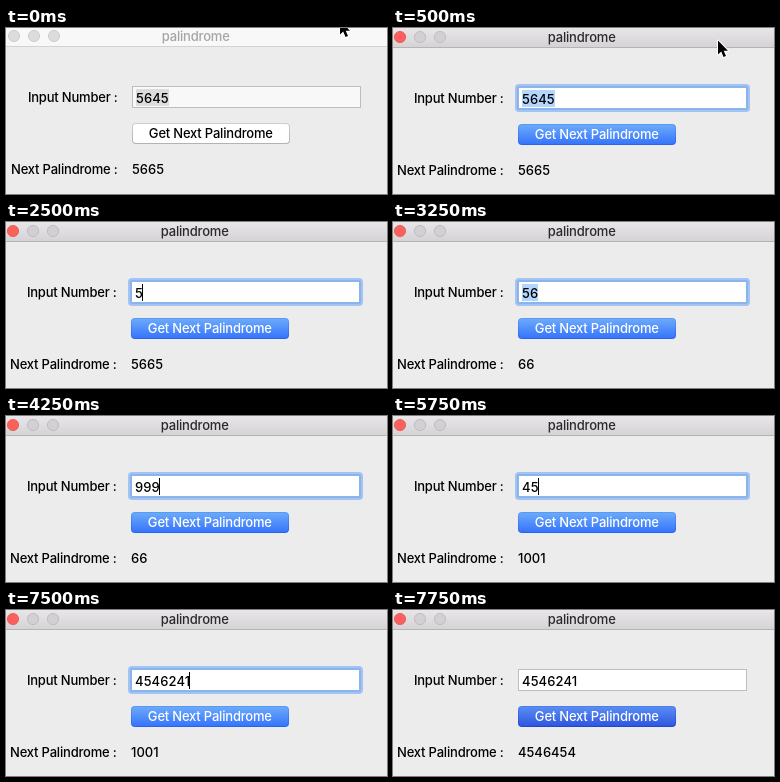
An HTML page with a canvas that plays this animation: 381x166 px, repeating every 8 s.

```html
<!DOCTYPE html>
<html lang="en">
<head>
<meta charset="utf-8">
<title>palindrome</title>
<style>
html, body { margin: 0; width: 100%; height: 100%; overflow: hidden; background: #ececec; }
canvas { display: block; }
</style>
</head>
<body>
<canvas id="stage" width="381" height="166"></canvas>
<script>
const ctx = document.getElementById('stage').getContext('2d');
const LOOP = 8000;
const FONT = '500 13px Inter, "Open Sans", sans-serif';
const FIELD_SPACING = 0.1;

// Each step changes some of the state and keeps the rest.
const steps = [
  [0, { active: false, focus: false, input: '5645', selected: true, result: '5665', pressed: false, cursor: [334, -7.5] }],
  [250, { cursor: [325, 12.5] }],
  [500, { active: true, focus: true }],
  [750, { cursor: [364, 1.5] }],
  [1000, { cursor: null }],
  [2500, { input: '5', selected: false }],
  [2750, { input: '56' }],
  [3250, { result: '66', selected: true }],
  [3750, { input: '9', selected: false }],
  [4000, { input: '99' }],
  [4250, { input: '999' }],
  [4750, { result: '1001', selected: true }],
  [5750, { input: '45', selected: false }],
  [6000, { input: '454' }],
  [6500, { input: '4546' }],
  [6750, { input: '45462' }],
  [7000, { input: '454624' }],
  [7500, { input: '4546241' }],
  [7750, { result: '4546454', focus: false, pressed: true }]
];

function stateAt(t) {
  const state = {};
  for (const [start, change] of steps) if (t >= start) Object.assign(state, change);
  return state;
}

function rect(x, y, w, h, fill) {
  ctx.fillStyle = fill;
  ctx.fillRect(x, y, w, h);
}

function rounded(x, y, w, h, r, fill) {
  ctx.beginPath();
  ctx.roundRect(x, y, w, h, r);
  ctx.fillStyle = fill;
  ctx.fill();
}

function shade(y0, y1, top, bottom) {
  const g = ctx.createLinearGradient(0, y0, 0, y1);
  g.addColorStop(0, top);
  g.addColorStop(1, bottom);
  return g;
}

function text(str, x, y, align = 'left', color = '#000', spacing = -0.2) {
  ctx.font = FONT;
  ctx.letterSpacing = spacing + 'px';
  ctx.textAlign = align;
  ctx.fillStyle = color;
  ctx.fillText(str, x, y);
}

function light(x, fill, line) {
  ctx.beginPath();
  ctx.arc(x, 9, 5.6, 0, Math.PI * 2);
  ctx.fillStyle = fill;
  ctx.fill();
  ctx.strokeStyle = line;
  ctx.lineWidth = 0.8;
  ctx.stroke();
}

function titleBar(active) {
  rect(-2, 0, 385, 20, active ? shade(0, 20, '#e8e6e8', '#d4d2d4') : '#f8f8f8');
  rect(-2, 19, 385, 1, active ? '#b4b4b4' : '#d2d2d2');
  light(7, active ? '#fc605c' : '#dcdcdc', active ? '#e9524c' : '#c6c6c6');
  for (const x of [27, 47]) light(x, active ? '#d2d0d2' : '#dcdcdc', active ? '#b9b7b9' : '#c6c6c6');
  text('palindrome', 188.7, 14, 'center', active ? '#2a2a2a' : '#a5a5a5');
}

function field({ active, focus, input, selected }) {
  if (focus) {
    rounded(122, 56, 235, 28, 4, '#a3c4f3');
    rounded(124, 58, 231, 24, 2, '#8bb3ec');
  } else {
    rect(125, 59, 229, 22, '#bdbdbd');
  }
  rect(126, 60, 227, 20, active ? '#fff' : '#f8f8f8');
  ctx.font = FONT;
  ctx.letterSpacing = FIELD_SPACING + 'px';
  const end = Math.floor(128.5 + ctx.measureText(input).width);
  if (selected) rect(129, 62, end - 128, 17, active ? '#b3d6fd' : '#dcdcdc');
  text(input, 129, 76, 'left', '#000', FIELD_SPACING);
  if (focus && !selected) rect(end, 62, 1, 17, '#000');
}

function button({ active, pressed }) {
  let face = '#fff', line = shade(96, 117, '#cecece', '#b2b2b2');
  if (pressed) {
    face = shade(96, 117, '#5c90f5', '#2c54de');
    line = shade(96, 117, '#4c80ea', '#2445cc');
  } else if (active) {
    face = shade(96, 117, '#6eacfb', '#3472fb');
    line = shade(96, 117, '#5a9bf6', '#2a60f0');
  }
  rounded(125, 96, 158, 21, 4, line);
  rounded(126, 97, 156, 19, 3, face);
  text('Get Next Palindrome', 203.8, 111, 'center', active ? '#fff' : '#000');
}

function pointer([x, y]) {
  const outline = [[0, 0], [0, 14], [3.2, 11], [5.5, 16.5], [8, 15.4], [5.7, 10.2], [10, 10.2]];
  ctx.beginPath();
  for (const [dx, dy] of outline) ctx.lineTo(x + dx, y + dy);
  ctx.closePath();
  ctx.lineJoin = 'round';
  ctx.lineWidth = 2;
  ctx.strokeStyle = '#fff';
  ctx.stroke();
  ctx.fillStyle = '#000';
  ctx.fill();
}

function draw(t) {
  const s = stateAt(t);
  rect(0, 0, 381, 166, '#ececec');
  ctx.save();
  // The window sits slightly to the upper right until it is activated.
  if (!s.active) ctx.translate(1, -1);
  titleBar(s.active);
  text('Input Number :', 110.5, 75, 'right');
  text('Next Palindrome :', 110.5, 147, 'right');
  text(s.result, 125, 147, 'left', '#000', 0);
  field(s);
  button(s);
  ctx.restore();
  if (s.cursor) pointer(s.cursor);
}

function tick() {
  draw(performance.now() % LOOP);
  requestAnimationFrame(tick);
}
tick();
</script>
</body>
</html>
```
